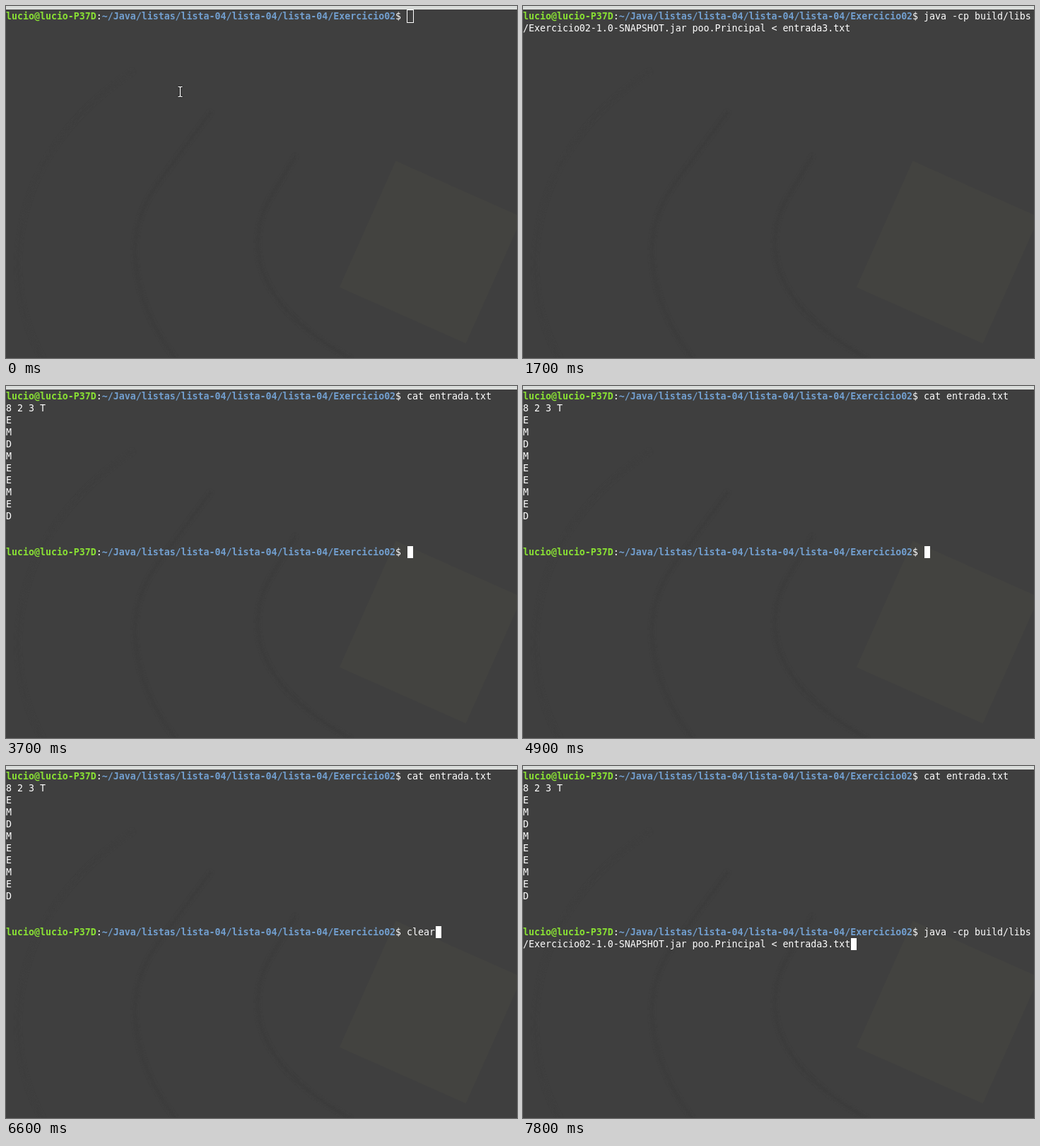
Recreate the animation shown at these times as an HTML page. Size 723 by 499 pixels, loop 8000 ms.

```html
<!DOCTYPE html>
<html lang="pt">
<head>
<meta charset="utf-8">
<style>
  html, body { margin: 0; width: 100%; height: 100%; overflow: hidden; background: #3f3f3f; }
  svg { display: block; }
  text { font: 13.288px "DejaVu Sans Mono", monospace; fill: #fff; white-space: pre; }
  .user { font-weight: bold; fill: #8ae234; }
  .path { font-weight: bold; fill: #729fcf; }
</style>
</head>
<body>
<svg width="723" height="499" viewBox="0 0 723 499">
  <defs>
    <filter id="soft" x="-20%" y="-20%" width="140%" height="140%"><feGaussianBlur stdDeviation="2"/></filter>
  </defs>
  <rect width="723" height="499" fill="#3f3f3f"/>
  <!-- faint wallpaper behind the terminal -->
  <g fill="none" stroke="#3b3b3b" stroke-width="4" filter="url(#soft)">
    <path d="M180 92Q20 200 17 365Q18 440 52 500" stroke="#3d3d3d"/>
    <path d="M290 150L213 254Q182 298 182 350Q186 430 240 500"/>
    <path d="M410 212L372 275Q356 305 356 342Q362 430 488 500"/>
  </g>
  <rect x="503" y="251" width="196" height="196" fill="#434340" transform="rotate(24 601 349)"/>
  <rect width="723" height="5" fill="#d9dcda"/>
  <g id="screen"></g>
  <path id="pointer" d="M-3-7H-1L0-6L1-7H3M0-6V6M-3 7H-1L0 6L1 7H3" fill="none" stroke="#fff" stroke-width="1.2"
    style="paint-order:stroke;filter:drop-shadow(0 0 .8px #000)"/>
</svg>
<script>
const LOOP = 8000, CELL = 8, LINE = 17, TOP = 6, PROMPT_COLS = 71;
const screen = document.getElementById('screen');
const pointer = document.getElementById('pointer');

const cat = 'cat entrada.txt';
const java = ['java -cp build/libs', '/Exercicio02-1.0-SNAPSHOT.jar poo.Principal &lt; entrada3.txt'];
const listing = ['8 2 3 T', ...'EMDMEEMED'];

const text = (row, s) => `<text x="0" y="${TOP + 13 + row * LINE}">${s}</text>`;
const prompt = (row, cmd = '') => text(row,
  '<tspan class="user">lucio@lucio-P37D</tspan>:' +
  '<tspan class="path">~/Java/listas/lista-04/lista-04/lista-04/Exercicio02</tspan>$ ' + cmd);
const runJava = row => prompt(row, java[0]) + text(row + 1, java[1]);
const printed = prompt(0, cat) + listing.map((s, i) => text(i + 1, s)).join('');

const cursor = (row, col) =>
  `<rect x="${col * CELL}" y="${TOP + row * LINE}" width="8" height="17" fill="#fff"/>`;
const after = (row, n = 0) => cursor(row, PROMPT_COLS + n);
const hollow = '<rect x="567.5" y="5.5" width="9" height="18" fill="none" stroke="#fff"/>';

const idle = printed + prompt(13);
const ready = printed + runJava(13);

// [start time, screen contents]
const steps = [
  [0, prompt(0) + hollow],
  [400, prompt(0) + after(0)],
  [800, prompt(0, 'clear') + after(0, 5)],
  [1100, runJava(0) + cursor(1, 59)],
  [1700, runJava(0)],
  [1800, prompt(0, cat) + after(0, 16)],
  [2400, prompt(0, cat)],
  [3600, prompt(0, cat) + after(0, 15)],
  [3700, idle + after(13)],
  [4300, idle],
  [4900, idle + after(13)],
  [5500, idle],
  [6100, idle + after(13)],
  [6400, printed + prompt(13, cat) + after(13, 15)],
  [6600, printed + prompt(13, 'clear') + after(13, 5)],
  [7000, ready + cursor(14, 59)],
  [7500, ready],
  [7700, ready + cursor(14, 59)],
  [7800, ready + cursor(14, 58)]
];

let shown;
function draw(now) {
  const t = now % LOOP;
  const step = steps.findLast(s => s[0] <= t);
  if (step !== shown) screen.innerHTML = (shown = step)[1];
  pointer.setAttribute('transform', t < 200 ? 'translate(246.5 121.5)' : 'translate(308.5 159.5)');
  pointer.setAttribute('visibility', t < 800 ? 'visible' : 'hidden');
}

const start = performance.now();
function frame() {
  draw(performance.now() - start);
  requestAnimationFrame(frame);
}
frame();
</script>
</body>
</html>
```
